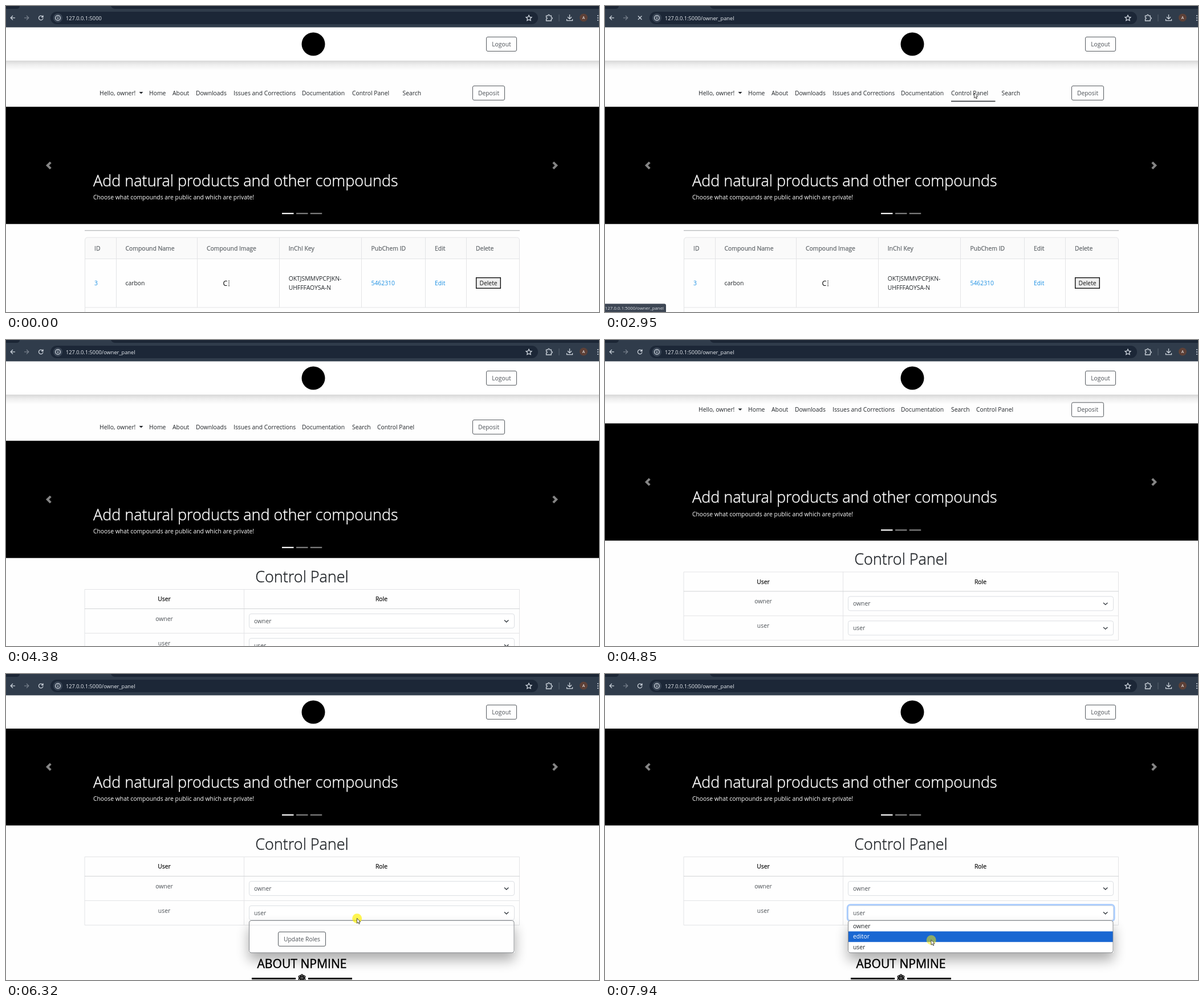
An HTML page for the animation above (8000 ms loop, 1040 px wide and 538 px high).

```html
<!DOCTYPE html>
<html lang="en">
<head>
<meta charset="utf-8">
<title>Control Panel</title>
<style>
html, body { margin: 0; width: 100%; height: 100%; overflow: hidden; background: #fff; }
svg { display: block; width: 1040px; height: 538px; }
text { font: 400 10.35px "Open Sans", "Noto Sans", sans-serif; color: #212529; fill: currentColor; white-space: pre; }
.mid { text-anchor: middle; }
.h1 { font-weight: 300; font-size: 27px; stroke: currentColor; stroke-width: .45; }
.white { color: #fff; }
.th { font-size: 10.4px; color: #62676b; stroke: currentColor; stroke-width: .25; }
.dark { color: #111; }
.soft { color: #4c5156; }
.link { color: #1a8fe3; }
.about { font-size: 21.1px; color: #000; stroke: currentColor; stroke-width: .45; }
.url { font-size: 9.25px; color: #e9edf2; }
.tip { font-size: 7.85px; color: #d5d9df; }
.icon { fill: none; stroke: #ccd3dc; stroke-width: 1.3; }
.rule { fill: none; stroke: #e3e4e6; }
.btn { fill: #fff; stroke: #555a5f; }
.select { fill: #fff; stroke: #dcdfe3; }
</style>
</head>
<body>
<svg id="stage" viewBox="0 0 1040 538"></svg>
<script>
const LOOP = 8000;
const USER = "owner";
const URL_BASE = "127.0.0.1:5000";

const text = (x, y, s, cls = "") => `<text x="${x}" y="${y}" class="${cls}">${s}</text>`;
const rect = (x, y, w, h, rest = "") => `<rect x="${x}" y="${y}" width="${w}" height="${h}" ${rest}/>`;
const path = (d, rest = 'class="icon"') => `<path d="${d}" ${rest}/>`;
const circle = (x, y, r, rest) => `<circle cx="${x}" cy="${y}" r="${r}" ${rest}/>`;
const group = (id, body) => `<g id="${id}">${body}</g>`;

const button = (x, y, w, label) =>
  rect(x + .5, y + .5, w - 1, 25, 'rx="2.5" class="btn"') + text(x + w / 2, y + 17, label, "mid soft");

const navItem = ([x, label]) => text(x, 157, label);

const roleRow = (y, name) =>
  text(277.5, y + 12.5, name, "mid soft") +
  rect(426.5, y + .5, 465, 25, 'rx="3.5" class="select"') +
  text(435, y + 17, name, "soft") +
  path(`M874 ${y + 11.5}l3.7 3.5 3.7-3.5`, 'fill="none" stroke="#343a40" stroke-width="1.4"');

function browserBar() {
  return rect(0, 0, 1040, 37.5, 'fill="#303c4b"') +
    path("M0 0H24Q24 5 18 5H0ZM184 0H1040V5H192Q186 5 184 0Z", 'fill="#1c2635"') +
    rect(78, 10, 855, 22, 'rx="11" fill="#1c2737"') +
    circle(91, 21, 8, 'fill="#384454"') +
    circle(91, 21, 4.3, 'class="icon"') + path("M91 20.3v3M91 18.3v1") +
    path("M16 20.8H8.5M12 17l-3.8 3.8 3.8 3.8") +
    path("M32 20.8h7.5M36 17l3.8 3.8-3.8 3.8", 'class="icon" opacity=".45"') +
    group("reload", path("M64.2 18.5A3.8 3.8 0 1 0 65 21.5M65 16.5v3h-3")) +
    group("stop", path("M58 17.5l6.5 6.5M64.5 17.5L58 24")) +
    path("M917 16.2l1.5 3.2 3.4.4-2.5 2.4.7 3.4-3.1-1.7-3.1 1.7.7-3.4-2.5-2.4 3.4-.4Z") +
    path("M947.5 17.2h3q0-2 1.4-2t1.4 2h3v3q2 0 2 1.4t-2 1.4v3h-8.8v-3q1.6 0 1.6-1.4t-1.6-1.4Z") +
    rect(969.5, 15, 1, 12, 'fill="#566270"') +
    path("M988.5 15v7.5M985 19.3l3.5 3.5 3.5-3.5M983.5 23v2.7h10V23") +
    circle(1013, 20.5, 7, 'fill="#5d4037"') +
    '<text x="1013" y="23.2" class="mid white" style="font-size:7px">A</text>' +
    [17, 21, 25].map(y => circle(1038, y, 1.1, 'fill="#ccd3dc"')).join("") +
    `<text id="url" x="105" y="24.5" class="url"></text>`;
}

function header() {
  return rect(0, 96, 1040, 17, 'fill="url(#shade)"') +
    rect(0, 37, 1040, 59, 'fill="#fff"') +
    circle(539, 67, 20.5, 'fill="#000"') +
    button(842, 54, 54, "Logout");
}

function hero() {
  const bar = (x, o) => rect(x, 363.7, 20.5, 2.2, `fill="#fff" opacity="${o}"`);
  const chevron = 'fill="none" stroke="#858585" stroke-width="4"';
  return rect(0, 177.2, 1040, 206.1) +
    text(153, 316.5, "Add natural products and other compounds", "h1 white") +
    text(153, 340.3, "Choose what compounds are public and which are private!", "white") +
    bar(484, 1) + bar(509, .5) + bar(533.7, .5) +
    path("M78.300 274.800l-5.500 5.500 5.500 5.500", chevron) +
    path("M959.700 274.800l5.500 5.500-5.500 5.500", chevron);
}

function compounds() {
  const heads = [[155, "ID"], [209.5, "Compound Name"], [352, "Compound Image"], [495.7, "InChI Key"],
    [640.5, "PubChem ID"], [752, "Edit"], [824, "Delete"]];
  const lines = [193, 335, 479, 623, 735, 807].map(x => `M${x}.5 407V530`).join("");
  return rect(138, 394, 763, 1.4, 'fill="#bcbec0"') +
    path("M138.500 444V412q0-5 5-5H895.500q5 0 5 5V444Z", 'fill="#fafafa"') +
    path(`M138.500 538V412q0-5 5-5H895.500q5 0 5 5V538M138 444.500H901M138 530H901${lines}`, 'class="rule"') +
    heads.map(([x, s]) => text(x, 430, s, "th")).join("") +
    text(155, 490.7, "3", "link") + text(209.5, 490.7, "carbon") +
    '<text x="380.5" y="491.8" style="font-size:12.5px;color:#000">C</text>' +
    path("M391 482.700v10", 'stroke="#222" stroke-width="1.5" stroke-dasharray="1.3 1.5"') +
    text(495.7, 482.5, "OKTJSMMVPCPJKN-") + text(495.7, 499, "UHFFFAOYSA-N") +
    text(640.5, 490.7, "5462310", "link") + text(752, 490.7, "Edit", "link") +
    rect(824.7, 477.7, 42.6, 18.6, 'fill="#efefef" stroke="#111" stroke-width="1.4"') +
    text(846, 490.7, "Delete", "mid dark");
}

function controlPanel() {
  return text(519, 426, "Control Panel", "h1 mid") +
    path("M138 438.500H900.500V558.500H138ZM417.500 438V558M138 515.500H900", 'class="rule"') +
    path("M138 472.500H901", 'stroke="#d2d4d6"') +
    text(277.5, 459.3, "User", "th dark mid") + text(658.5, 459.3, "Role", "th dark mid") +
    roleRow(481, USER) + roleRow(524, "user") +
    button(477, 570, 84, "Update Roles") +
    text(519, 633.5, "ABOUT NPMINE", "about mid") +
    rect(431, 651, 77, 3) + rect(530, 651, 77, 3) +
    [0, 60, 120].map(a => `<ellipse rx="6.2" ry="2.9" fill="none" stroke="#000" stroke-width="1.6"
      transform="translate(519 651.500) rotate(${a + 30})"/>`).join("") +
    circle(519, 651.5, 1.6, "");
}

function popup() {
  const rows = [USER, "editor", "user"];
  return rect(426, 446, 466, 57, 'rx="4" fill="#000" opacity=".32" filter="url(#blur)" clip-path="url(#outside)"') +
    group("options", rect(426.5, 433.5, 464.5, 56.5, 'rx="3.5" fill="#fff"') +
      rect(427, 433.8, 464, 18.7, 'id="mark" fill="#1967d2"') +
      rows.map((s, i) => text(435, 446.7 + 18.7 * i, s, "option")).join("")) +
    rect(426.5, 433.5, 464.5, 56.5, 'rx="3.5" fill="none" stroke="#85888c"');
}

const defs = `<defs>
  <linearGradient id="shade" x2="0" y2="1">
    <stop stop-color="#000" stop-opacity=".15"/><stop offset=".45" stop-color="#000" stop-opacity=".06"/>
    <stop offset="1" stop-color="#000" stop-opacity="0"/>
  </linearGradient>
  <filter id="blur" x="-10%" y="-80%" width="120%" height="260%"><feGaussianBlur stdDeviation="11"/></filter>
  <clipPath id="outside"><path clip-rule="evenodd" d="M380 400H940V538H380ZM426 433H892V490H426Z"/></clipPath>
</defs>`;

const sharedNav = [[164, `Hello, ${USER}!`], [251, "Home"], [292, "About"], [333, "Downloads"],
  [399, "Issues and Corrections"], [519, "Documentation"]];

const stage = document.getElementById("stage");
stage.innerHTML = defs + rect(0, 0, 1040, 538, 'fill="#fefefe"') +
  group("page",
    sharedNav.map(navItem).join("") + path("M233.500 151h7l-3.500 3.600Z", 'fill="#212529"') +
    button(818, 140, 57, "Deposit") + hero() +
    group("before", [[607, "Control Panel"], [695.5, "Search"]].map(navItem).join("") + compounds()) +
    group("after", [[607, "Search"], [651, "Control Panel"]].map(navItem).join("") + controlPanel()) +
    rect(607, 166.7, 77.5, 1.5, 'id="underline" fill="#212529"')) +
  header() + browserBar() +
  rect(425.2, 405.7, 468, 28.6, 'id="ring" rx="5" fill="none" stroke="#a9ccfd" stroke-width="2.8"') +
  group("popup", popup()) +
  group("status", path("M0 523.500H104q3 0 3 3V538H0Z", 'fill="#1c2737"') +
    text(0, 534, `${URL_BASE}/${USER}_panel`, "tip")) +
  circle(0, 0, 8.5, 'id="click" fill="#fff000"') +
  group("cursor",
    group("arrow", path("M.5.5V9.300L2.600 7.500 4 10.600 5.400 10 4 6.900H6.700Z",
      'fill="#fff" stroke="#222" stroke-width=".8"')) +
    group("hand", path("M-1 1Q0-.8 1 1V4.500L4 5Q5.300 5.300 5 7.500L4.300 11.500H-.5L-3.500 7.500Q-3.300 6.300-1 7.500Z",
      'fill="#fff" stroke="#222" stroke-width=".9"')));

const el = {};
stage.querySelectorAll("[id]").forEach(n => el[n.id] = n);
const options = stage.querySelectorAll(".option");

const linear = p => p;
const smooth = p => p * p * (3 - 2 * p);

// start, end, steps, from, to, easing
const moves = [
  [1150, 1350, 4, [1110, 580], [797, 367], linear],
  [1610, 2410, 13, [797, 367], [647, 152.5], smooth],
  [3780, 4380, 10, [647, 152.5], [1041, 190], linear],
  [5390, 5460, 2, [1216, -66], [706, 380], linear],
  [5790, 6060, 5, [706, 380], [615, 429], smooth],
  [6870, 7410, 9, [615, 429], [571.5, 467], smooth]
];

function cursorAt(t) {
  let pos = moves[0][3];
  for (const [start, end, steps, from, to, ease] of moves) {
    if (t < start) break;
    const step = Math.floor((t - start) / (end - start) * (steps - 1) + 1e-6) + 1;
    const p = ease(Math.min(1, step / steps));
    pos = from.map((v, i) => v + (to[i] - v) * p);
  }
  return pos;
}

function track(t, keys) {
  let [t0, v0] = keys[0];
  for (const [t1, v1] of keys) {
    if (t < t1) return v0 + (v1 - v0) * Math.max(0, (t - t0) / (t1 - t0));
    [t0, v0] = [t1, v1];
  }
  return v0;
}

const within = (t, a, b) => t >= a && t < b;
const show = (node, on) => node.setAttribute("visibility", on ? "inherit" : "hidden");

function draw(t) {
  const loaded = t >= 3110;
  const requested = t >= 2720;
  show(el.before, !loaded);
  show(el.after, loaded);
  show(el.reload, !within(t, 2720, 3180));
  show(el.stop, within(t, 2720, 3180));
  el.url.textContent = URL_BASE + (requested ? `/${USER}_panel` : "");

  const scroll = t < 4850 ? 0 : t < 4920 ? 30.6 : t < 4990 ? 77 : t < 5060 ? 109 : 117;
  el.page.setAttribute("transform", `translate(0 ${-scroll})`);

  const line = loaded
    ? track(t, [[3180, 0], [3460, 77.5], [3850, 77.5], [4100, 0]])
    : track(t, [[2200, 0], [2410, 77.5]]);
  el.underline.setAttribute("x", loaded ? 651 : 607);
  el.underline.setAttribute("width", line);
  el.status.setAttribute("opacity",
    track(t, [[2270, 0], [2400, 1], [2880, 1], [2950, .85], [3109, .85], [3200, 0], [3380, 0], [3500, 1], [4100, 1], [4380, 0]]));

  const [x, y] = cursorAt(t);
  const hand = within(t, 2270, 2720) || within(t, 3240, 3900);
  el.cursor.setAttribute("transform", `translate(${x} ${y})`);
  show(el.hand, hand);
  show(el.arrow, !hand);

  const clicked = within(t, 2490, 2640) || within(t, 6320, 6480) || t >= 7940;
  show(el.click, clicked);
  el.click.setAttribute("transform", `translate(${x + .7} ${y + .7})`);
  el.click.setAttribute("opacity", t >= 7940 ? .5 : .68);

  show(el.popup, t >= 6320);
  show(el.options, t >= 6380);
  el.ring.setAttribute("opacity", track(t, [[6330, 0], [6540, 1]]));
  const row = y < 434 ? 2 : y < 452.5 ? 0 : 1;
  el.mark.setAttribute("y", 433.8 + 18.7 * row);
  options.forEach((o, i) => o.style.color = i === row ? "#fff" : "#212529");
}

function tick() {
  draw(performance.now() % LOOP);
  requestAnimationFrame(tick);
}
tick();
</script>
</body>
</html>
```
